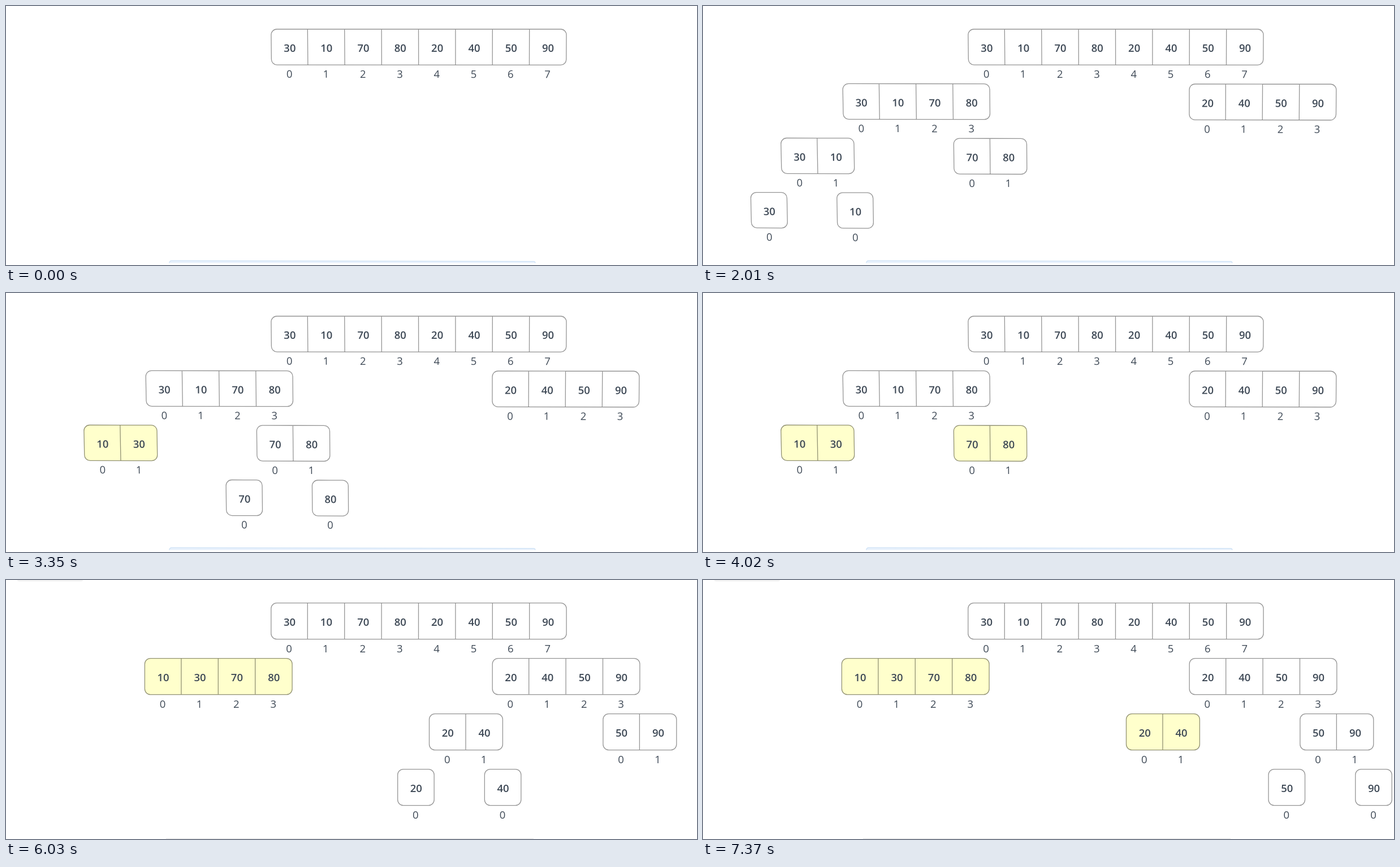
Write an HTML page with a canvas that moves like this. It is 1222x458 px and loops after 8 s.

```html
<!DOCTYPE html>
<html lang="en">
<head>
<meta charset="utf-8">
<title>Merge sort</title>
<style>
  html, body { margin: 0; width: 100%; height: 100%; overflow: hidden; background: #fff; }
  canvas { display: block; }
</style>
</head>
<body>
<canvas id="stage" width="1222" height="458"></canvas>
<script>
const ctx = document.getElementById('stage').getContext('2d');
const LOOP = 8000, STEP = 670;
const STRAIGHTEN_STEP = 7;   // the slightly tilted view becomes straight here
const TOP = 40.6, ROW_GAP = 98, HEIGHT = 64, CELL = 65.4, RADIUS = 10;
const FONT = '"Open Sans", "Noto Sans", sans-serif';

// Run the sort once, recording in which steps each array is visible.
const arrays = [];
let clock = 0;

function addArray(values, row, slot, sorted = false) {
  const array = { values, row, slot, sorted, from: clock, to: Infinity };
  arrays.push(array);
  return array;
}

function mergeSort(array) {
  const { values, row, slot } = array;
  if (values.length < 2) return array;
  const middle = values.length / 2;
  clock++;
  const halves = [values.slice(0, middle), values.slice(middle)]
    .map((half, i) => addArray(half, row + 1, slot * 2 + i))
    .map(mergeSort);
  clock++;
  for (const used of [array, ...halves]) used.to = clock;
  return addArray([...values].sort((a, b) => a - b), row, slot, true);
}

mergeSort(addArray([30, 10, 70, 80, 20, 40, 50, 90], 0, 0));

const straight = (x, y) => [x, y];

function tilted(x, y) {
  const depth = y - TOP;
  return [x + 3e-5 * depth * (810 - x), y + 0.4 - 1.05e-5 * depth * (1850 - x)];
}

// Text follows the local slant of the projection.
function drawText(text, x, y, weight, project) {
  const [px, py] = project(x, y);
  const [rightX, rightY] = project(x + 1, y);
  const [downX, downY] = project(x, y + 1);
  ctx.setTransform(rightX - px, rightY - py, downX - px, downY - py, px, py);
  ctx.font = `${weight} 18.5px ${FONT}`;
  ctx.fillText(text, 0, 0);
  ctx.resetTransform();
}

function drawArray({ values, row, slot, sorted }, project) {
  const left = 22 + (446.8 + 1229.6 * slot) / 2 ** row;
  const right = left + CELL * values.length - 0.9;
  const top = TOP + row * ROW_GAP, bottom = top + HEIGHT;
  const corners = [[left, top], [right, top], [right, bottom], [left, bottom]]
    .map(corner => project(...corner));

  ctx.beginPath();
  ctx.moveTo(...project((left + right) / 2, top));
  for (let i = 1; i <= 4; i++) {
    ctx.arcTo(...corners[i % 4], ...corners[(i + 1) % 4], RADIUS);
  }
  ctx.closePath();
  ctx.fillStyle = sorted ? '#ffffcc' : '#fff';
  ctx.fill();
  for (let i = 1; i < values.length; i++) {
    const x = left + CELL * i - 0.9;
    ctx.moveTo(...project(x, top));
    ctx.lineTo(...project(x, bottom));
  }
  ctx.lineWidth = 1.3;
  ctx.strokeStyle = sorted ? '#929274' : '#959595';
  ctx.stroke();

  ctx.fillStyle = '#3d4855';
  ctx.textAlign = 'center';
  values.forEach((value, i) => {
    const x = left + 32.7 + CELL * i - (i ? 0.5 : 0);
    drawText(value, x, top + 40.8, 600, project);
    drawText(i, x - 1, top + 87, 400, project);
  });
}

function drawBluePanel() {
  ctx.beginPath();
  ctx.moveTo(288.7, 454.5);
  ctx.arcTo(288.7, 450.4, 600, 451, 4);
  ctx.arcTo(936, 451.6, 936, 454.5, 3);
  ctx.lineTo(936, 454.5);
  ctx.fillStyle = '#e8f1fc';
  ctx.fill();
  ctx.lineWidth = 1.2;
  ctx.strokeStyle = '#cde1f5';
  ctx.stroke();
}

function drawGreyEdges() {
  ctx.fillStyle = '#f2f2f2';
  ctx.beginPath();
  ctx.roundRect(20, -10, 116, 12.5, 3);
  ctx.fill();
  ctx.fillStyle = '#e4e4e4';
  ctx.fillRect(283, 457, 650, 1);
}

function draw(now) {
  const step = Math.floor((now % LOOP) / STEP);
  const isTilted = step < STRAIGHTEN_STEP;
  ctx.fillStyle = '#fff';
  ctx.fillRect(0, 0, 1222, 458);
  if (isTilted) drawBluePanel();
  else drawGreyEdges();
  for (const array of arrays) {
    if (step >= array.from && step < array.to) {
      drawArray(array, isTilted ? tilted : straight);
    }
  }
}

function frame() {
  draw(performance.now());
  requestAnimationFrame(frame);
}
frame();
</script>
</body>
</html>
```
